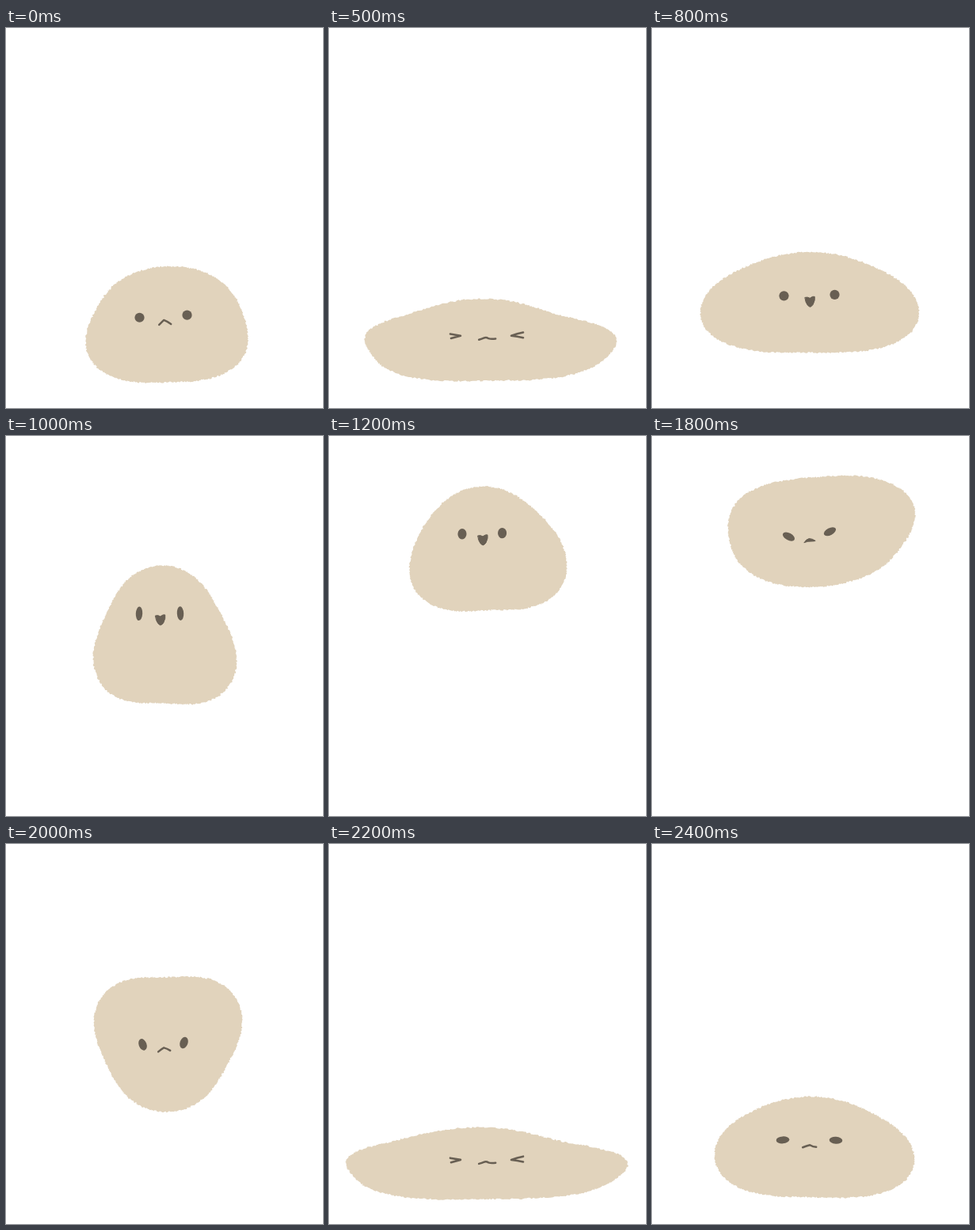
These frames come from a looping animation (400x480 px, 2.5 s). An HTML page with a canvas:

```html
<!DOCTYPE html>
<html lang="en">
<head>
<meta charset="utf-8">
<title>Bouncing dough</title>
<style>
  html, body { margin: 0; width: 100%; height: 100%; overflow: hidden; background: #fff; }
  canvas { display: block; }
</style>
</head>
<body>
<canvas id="stage" width="400" height="480"></canvas>
<script>
const ctx = document.getElementById('stage').getContext('2d');
const LOOP = 2500, STEP = 100, HOLD = 300;
const BODY = '#e1d3bc', INK = '#685f53';

// x, w, bottom, h: the body's box. weight: heavy base (+) or heavy top (-).
// skew, peak, side: further bulges. faceY: eye line as a share of the height.
// gap: between the eyes. stretch: eye width against height. tilt: eye slant in degrees.
const BASE = {
  x: 203, weight: 0, skew: 0, peak: 0, side: 0,
  faceX: 198.5, faceY: .43, gap: 52, stretch: 1, tilt: 0
};
const FLAT = { ...BASE, weight: .04, skew: .012, peak: .039, side: .024, faceY: .447, gap: 78, mouth: 'wave' };
const POSES = {
  rest:   { ...BASE, w: 205, bottom: 448, h: 147, weight: .055, skew: -.02, gap: 60, mouth: 'frown' },
  flat:   { ...FLAT, x: 204, w: 318, bottom: 446, h: 104 },
  splat:  { ...FLAT, x: 199, w: 356, bottom: 449, h: 91 },
  launch: { ...BASE, x: 199, w: 276, bottom: 410, h: 127, weight: .058, peak: .016, gap: 64, mouth: 'beak' },
  rise:   { ...BASE, x: 200.5, w: 181, bottom: 339, h: 175.5, weight: .095, skew: .017,
            faceX: 194, faceY: .346, stretch: .69, tilt: 3, mouth: 'beak' },
  top:    { ...BASE, x: 201, w: 206, bottom: 174, h: 150.5, weight: .076, peak: .014, side: .026,
            faceX: 193, faceY: .39, gap: 50, mouth: 'chirp' },
  apex:   { ...BASE, x: 215, w: 250, bottom: 158, h: 149, skew: -.04, stretch: 1.2, tilt: 14, mouth: 'scowl' },
  tip:    { ...BASE, x: 214, w: 236, bottom: 191, h: 141, weight: -.04, skew: -.061,
            faceY: .524, stretch: 1.35, tilt: 28, mouth: 'scowl' },
  fall:   { ...BASE, x: 204.5, w: 187, bottom: 338.5, h: 171, weight: -.087, skew: -.011,
            faceY: .495, stretch: .81, tilt: -20, mouth: 'pout' },
  land:   { ...BASE, x: 205, w: 252, bottom: 447, h: 128, weight: .058, skew: .023, peak: .016,
            gap: 67, stretch: 1.36, tilt: -4, mouth: 'dash' }
};

const easeOut = p => 1 - (1 - p) ** 1.8;
const TIMELINE = [
  [200, 'rest'], [500, 'flat'], [700, 'splat'], [800, 'launch'], [1000, 'rise', easeOut],
  [1400, 'top'], [1600, 'apex'], [1800, 'tip'], [2000, 'fall'], [2200, 'splat'], [2400, 'land']
];

const MOUTHS = {
  frown: 'M-6 3Q-3 0 0-3Q4-1.5 9 2',
  pout: 'M-7 2.5Q-3-1 0-2.5Q4-1.5 8 1',
  dash: 'M-9 1.5Q-4-.5 0-1.5Q4 .8 8 1',
  wave: 'M-10-2.5Q-6-3.5-4-4.5Q-1-6 2-4Q5-3 11-3.7',
  beak: 'M-6-5Q-3-6 0-4Q4-7 6-6Q7-2 4 4Q2 7 0 7Q-3 6-5 1Z',
  chirp: 'M-8-5Q-4-4 0-4Q4-5 8-6.5L4.5-2.5Q3 2.5 0 2.5Q-3 2-4.5-2.5Z',
  scowl: 'M-7 3Q-5-1-1-2Q3-2 7 .8Q6 1.3 3 1.4Q-3 1-7 3Z'
};

function random(seed) {
  return () => {
    seed = (seed * 1664525 + 1013904223) >>> 0;
    return seed / 4294967296;
  };
}

function poseAt(t) {
  let i = 0;
  while (i < TIMELINE.length - 2 && TIMELINE[i + 1][0] <= t) i++;
  const [from, nameA, ease = p => p] = TIMELINE[i];
  const [to, nameB] = TIMELINE[i + 1];
  const raw = Math.min(1, Math.max(0, (t - from) / (to - from)));
  const a = POSES[nameA], b = POSES[nameB], p = ease(raw);
  const pose = { mouth: raw <= .5 ? a.mouth : b.mouth };
  for (const key in a) {
    if (key !== 'mouth') pose[key] = a[key] + (b[key] - a[key]) * p;
  }
  return pose;
}

// A circle with a few harmonics; a peak takes away squareness.
function radius(angle, { weight, skew, peak, side }) {
  const square = .03 - 1.1 * peak;
  return 1 + weight * (Math.sin(angle) + Math.sin(3 * angle)) + skew * Math.sin(2 * angle)
    + side * Math.cos(3 * angle) - square * Math.cos(4 * angle) - peak * Math.sin(5 * angle);
}

// Maps values onto the span from start to start + size.
function fit(values, start, size) {
  const low = Math.min(...values), high = Math.max(...values);
  return values.map(v => start + (v - low) / (high - low) * size);
}

function drawBody(pose, seed) {
  const rnd = random(seed), rough = () => (rnd() - .5) * 1.9;
  const angles = Array.from({ length: 520 }, (_, i) => i / 520 * Math.PI * 2);
  const xs = fit(angles.map(a => Math.cos(a) * radius(a, pose)), pose.x - pose.w / 2, pose.w);
  const ys = fit(angles.map(a => Math.sin(a) * radius(a, pose)), pose.bottom - pose.h, pose.h);
  ctx.fillStyle = BODY;
  ctx.beginPath();
  xs.forEach((x, i) => ctx.lineTo(x + rough(), ys[i] + rough()));
  ctx.fill();
}

function drawEye(x, y, stretch, tilt) {
  ctx.beginPath();
  ctx.ellipse(x, y, 6.1 * stretch, 6.1 / stretch, tilt * Math.PI / 180, 0, Math.PI * 2);
  ctx.fill();
}

function drawPath(x, y, d, width) {
  const path = new Path2D(d);
  ctx.save();
  ctx.translate(x, y);
  ctx.lineWidth = width;
  ctx.stroke(path);
  if (d.endsWith('Z')) ctx.fill(path);
  ctx.restore();
}

function drawFace({ bottom, h, skew, faceX, faceY, gap, stretch, tilt, mouth }) {
  const y = bottom - h * (1 - faceY);
  const left = faceX - gap / 2, right = faceX + gap / 2, rise = .75 - 40 * skew;
  ctx.fillStyle = ctx.strokeStyle = INK;
  ctx.lineCap = ctx.lineJoin = 'round';
  if (mouth === 'wave') {
    drawPath(left, y + .5, 'M-6.5-2.5L6.5-.3L-5.5 3', 2.6);
    drawPath(right, y - .5, 'M7.5-3.5Q0-2-7.5 .8Q0 1.5 7.5 3.3', 2.6);
  } else {
    drawEye(left, y + rise, stretch, tilt);
    drawEye(right, y - rise, stretch, -tilt);
  }
  drawPath(faceX + .7, y + 7.7, MOUTHS[mouth], MOUTHS[mouth].endsWith('Z') ? 1 : 2.5);
}

let shown = -1;
function tick(now) {
  const t = now % LOOP;
  const step = t < HOLD ? 0 : Math.floor(t / STEP) * STEP;
  if (step !== shown) {
    shown = step;
    const pose = poseAt(step);
    ctx.fillStyle = '#fff';
    ctx.fillRect(0, 0, 400, 480);
    drawBody(pose, step + 17);
    drawFace(pose);
  }
  requestAnimationFrame(tick);
}
tick(performance.now());
</script>
</body>
</html>
```
